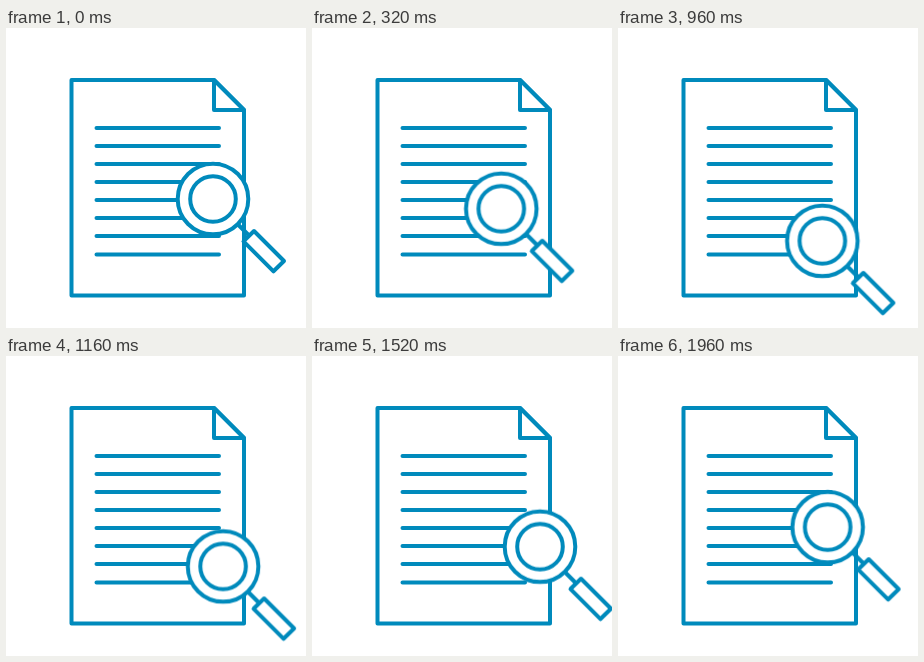
Recreate the animation shown at these times as an HTML page. Size 300 px wide and 300 px high, loop 2 s.

```html
<!DOCTYPE html>
<html lang="en">
<head>
<meta charset="utf-8">
<title>Document search</title>
<style>
  html, body { margin: 0; width: 100%; height: 100%; overflow: hidden; background: #fff; }
  svg {
    display: block; width: 100vw; height: 100vh;
    fill: #fff; stroke: #008abc; stroke-width: 4;
    stroke-linecap: round; stroke-linejoin: round;
  }
  /* The lens circles counterclockwise while staying upright. */
  .lens { animation: orbit 2s steps(50) infinite; }
  @keyframes orbit {
    from { transform: translate(207px, 192px) rotate(0deg) translateY(-21px) rotate(0deg); }
    to { transform: translate(207px, 192px) rotate(-360deg) translateY(-21px) rotate(360deg); }
  }
</style>
</head>
<body>
<svg viewBox="0 0 300 300">
  <path d="M65.5 52H208L238 82V267.5H65.5Z"/>
  <path d="M208 52V82H238Z"/>
  <path d="M90.5 100H213M90.5 118H213M90.5 136H213M90.5 154H213M90.5 172H213M90.5 190H213M90.5 208H213M90.5 226.5H213"/>
  <g class="lens">
    <path d="M25 25.5L36 36.5"/>
    <path d="M41 32L71 62L60.5 72.3L30.5 42.3Z"/>
    <circle r="35.3"/>
    <circle r="22.8"/>
  </g>
</svg>
</body>
</html>
```
